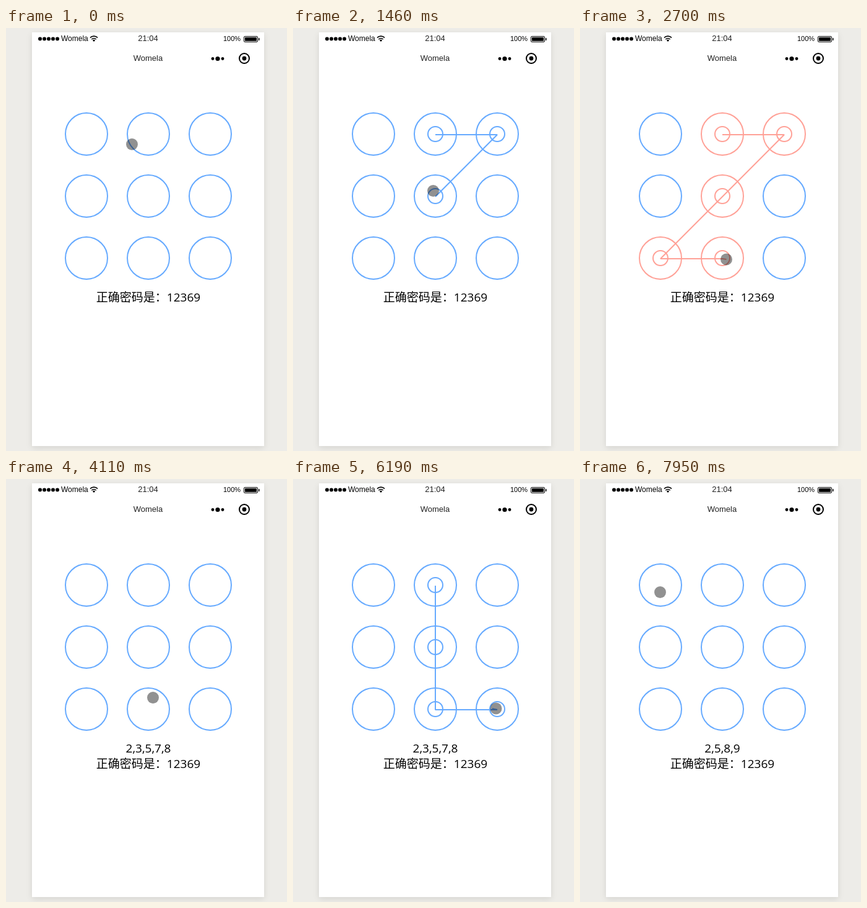
Write an HTML page with a canvas that moves like this. It is 454 px wide and 682 px high and loops after 8000 ms.

```html
<!DOCTYPE html>
<html lang="zh">
<head>
<meta charset="utf-8">
<title>Pattern lock</title>
<style>
  html, body { margin: 0; width: 100%; height: 100%; overflow: hidden; background: #edece8; }
  .phone { position: absolute; left: 42px; top: 7px; width: 375px; height: 667px;
    background: #fff; box-shadow: 0 3px 10px rgba(0, 0, 0, .1); }
  svg, canvas { position: absolute; left: 0; top: 0; }
  text { font-family: "Liberation Sans", Arial, sans-serif; }
  .mid { text-anchor: middle; }
  .note { font: 19px "Open Sans", "Noto Sans CJK SC", "Noto Sans CJK", sans-serif; }
</style>
</head>
<body>
<div class="phone"></div>
<svg width="454" height="682" viewBox="0 0 454 682">
  <g id="signal"></g>
  <text x="89" y="21" font-size="12">Womela</text>
  <g fill="none" stroke="#000" stroke-width="1.6">
    <path d="M136 15.6 A8.6 8.6 0 0 1 148 15.6"/>
    <path d="M138.3 18.2 A5.3 5.3 0 0 1 145.7 18.2"/>
  </g>
  <path d="M142 22 L139.9 19.9 A3 3 0 0 1 144.1 19.9 Z"/>
  <text class="mid" x="229.5" y="21" font-size="13" fill="#222">21:04</text>
  <text x="351" y="21" font-size="11">100%</text>
  <rect x="384.5" y="13.5" width="22" height="9" rx="1.5" fill="none" stroke="#000"/>
  <rect x="386" y="15" width="19" height="6" rx=".5"/>
  <rect x="408" y="16" width="1.5" height="4" rx=".5"/>
  <text class="mid" x="229.5" y="53" font-size="13" fill="#222">Womela</text>
  <circle cx="334" cy="49.5" r="2.4"/>
  <circle cx="342" cy="49.5" r="3.6"/>
  <circle cx="350" cy="49.5" r="2.4"/>
  <circle cx="385" cy="49" r="8" fill="none" stroke="#000" stroke-width="2"/>
  <circle cx="385" cy="49" r="3.4"/>
  <text id="result" class="mid note" x="230" y="441"></text>
  <text id="answer" class="mid note" x="230" y="441">正确密码是：12369</text>
</svg>
<canvas id="lock" width="454" height="682"></canvas>
<script>
const LOOP = 8000, TICK = 77, BLUE = '#66aaff', RED = '#ffa197';

// Each glide carries the pointer on from wherever it rests
const glide = (from, to, x, y) => ({ from, to, goal: [x, y] });
const START = [203.5, 187.5];
const GLIDES = [
  glide(290, 600, 134.5, 169.5),
  glide(750, 980, 347.5, 172),
  glide(1150, 1385, 250, 252),
  glide(1460, 1460, 226.5, 262.5),
  glide(1540, 1930, 138.5, 372),
  glide(2000, 2550, 236.5, 373),
  glide(4110, 4110, 237.5, 352.5),
  glide(4190, 4570, 140.5, 177.5),
  glide(4740, 5045, 237, 173),
  glide(5120, 5200, 225.5, 203.5),
  glide(5275, 5500, 228, 335.5),
  glide(5580, 5660, 234, 372),
  glide(5735, 6190, 328, 370),
  glide(7110, 7720, 124.5, 183),
  glide(7950, 7950, 129.5, 182.5)
];
const TRIES = [
  { press: 750, fail: 2700, reset: 3480 },
  { press: 4740, fail: 6650, reset: 7110 }
];

const CELLS = Array.from({ length: 9 }, (_, i) =>
  ({ id: i + 1, x: 130 + i % 3 * 100, y: 171 + Math.floor(i / 3) * 100 }));

const ctx = document.getElementById('lock').getContext('2d');
const result = document.getElementById('result');
const answer = document.getElementById('answer');

document.getElementById('signal').innerHTML =
  [0, 1, 2, 3, 4].map(i => `<circle cx="${55 + 7 * i}" cy="17.5" r="3"/>`).join('');

const easeOut = k => 1 - (1 - k) ** 1.4;

// Pointer position, advancing in whole ticks
function pointer(t) {
  let pos = START;
  for (const { from, to, goal } of GLIDES) {
    if (t < from) break;
    const n = Math.round((to - from) / TICK);
    const step = (to - from) / n || TICK;
    const tick = Math.min(n, Math.floor((t - from) / step + .1));
    const k = easeOut((tick + 1) / (n + 1));
    pos = pos.map((p, i) => p + (goal[i] - p) * k);
  }
  return pos;
}

// Cells in the order the pressed pointer enters them
function trace({ press, fail }) {
  const hits = [];
  for (let t = press; t < fail; t += 5) {
    const [x, y] = pointer(t);
    const cell = CELLS.find(c => Math.hypot(c.x - x, c.y - y) < 34);
    if (cell && !hits.some(h => h.cell === cell)) hits.push({ t, cell });
  }
  return hits;
}
for (const a of TRIES) a.hits = trace(a);

function ring({ x, y }, r, color) {
  ctx.beginPath();
  ctx.arc(x, y, r, 0, 2 * Math.PI);
  ctx.strokeStyle = color;
  ctx.stroke();
}

function drawLock(t) {
  const attempt = TRIES.find(a => t >= a.press && t < a.reset);
  const path = attempt ? attempt.hits.filter(h => t >= h.t).map(h => h.cell) : [];
  const color = attempt && t >= attempt.fail ? RED : BLUE;

  ctx.lineWidth = 2;
  for (const cell of CELLS) {
    const hit = path.includes(cell);
    ring(cell, 34, hit ? color : BLUE);
    if (hit) ring(cell, 12, color);
  }
  if (path.length) {
    ctx.beginPath();
    for (const { x, y } of path) ctx.lineTo(x, y + 1);
    ctx.lineTo(...pointer(t - TICK)); // the line trails by one tick
    ctx.lineJoin = 'bevel';
    ctx.strokeStyle = color;
    ctx.stroke();
  }
}

function drawPointer(t) {
  ctx.beginPath();
  ctx.arc(...pointer(t), 9.5, 0, 2 * Math.PI);
  ctx.fillStyle = 'rgba(0, 0, 0, .43)';
  ctx.fill();
}

function showResult(t) {
  const done = TRIES.filter(a => t >= a.reset + TICK).pop();
  const label = done ? done.hits.map(h => h.cell.id).join() : '';
  if (result.textContent !== label) result.textContent = label;
  answer.setAttribute('y', done ? 466 : 441);
}

function draw(t) {
  ctx.clearRect(0, 0, 454, 682);
  drawLock(t);
  drawPointer(t);
  showResult(t);
}

let begin;
function frame(now) {
  begin ??= now;
  draw((now - begin) % LOOP);
  requestAnimationFrame(frame);
}
draw(0);
requestAnimationFrame(frame);
</script>
</body>
</html>
```
